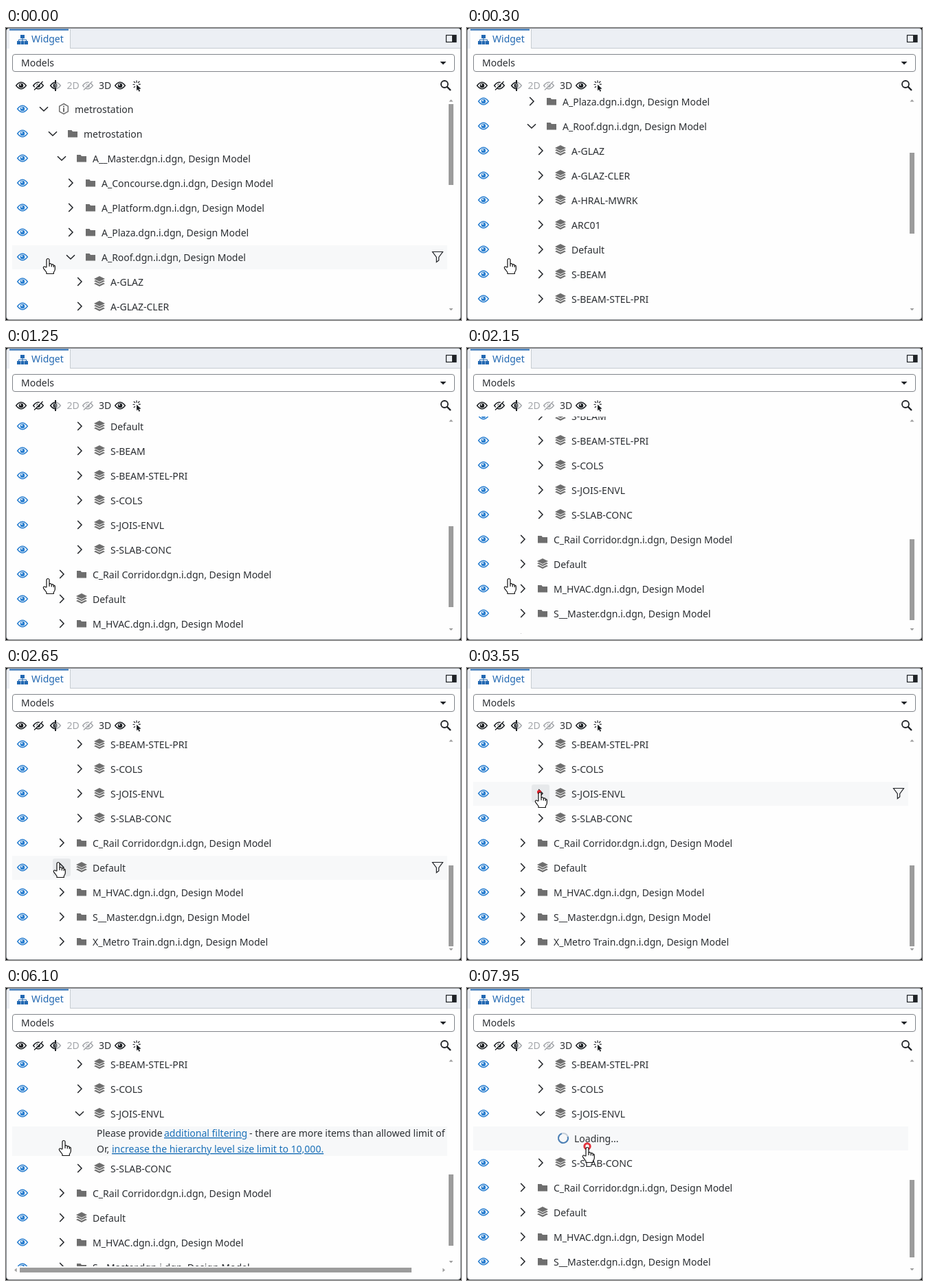
Recreate the animation shown at these times as an HTML page. Size 662x426 px, loop 8 s.

```html
<!DOCTYPE html>
<html lang="en">
<head>
<meta charset="utf-8">
<title>Model tree</title>
<style>
html, body { margin: 0; width: 100%; height: 100%; overflow: hidden; background: #000; }
svg { display: block; width: 662px; height: 426px; font: 14px "Noto Sans", "Open Sans", sans-serif; }
text { fill: #2b2e32; white-space: pre; }
.line { fill: none; stroke: currentColor; stroke-width: 1.5; }
.dark { color: #1f2226; }
.dim { color: #a3a6aa; }
.blue { color: #2a7fd0; }
.gray { color: #6e6e6e; }
.link { fill: #1a70b8; text-decoration: underline; }
.link.hot { fill: #0c4a80; }
.bar { fill: #9c9c9c; }
</style>
</head>
<body>
<svg viewBox="0 0 662 426">
  <defs>
    <g id="eye">
      <path class="line" d="M-7.3 0Q0-9.4 7.3 0Q0 9.4-7.3 0Z"/>
      <circle r="3.3" fill="currentColor"/>
      <circle cx="-1" cy="-1.2" r="1.1" fill="#fff"/>
    </g>
    <g id="eyeOff">
      <path class="line" d="M-7.3 0Q0-9.4 7.3 0Q0 9.4-7.3 0Z"/>
      <circle r="2.8" fill="currentColor"/>
      <path d="M-7 5.5L6-7" stroke="#fefefe" stroke-width="2"/>
      <path class="line" d="M-6 6.5L6.5-6"/>
    </g>
    <path id="closed" class="line" stroke-width="1.7" d="M-2.8-6L3 0L-2.8 6"/>
    <path id="open" class="line" stroke-width="1.7" d="M-6-2.8L0 3L6-2.8"/>
    <path id="folder" fill="currentColor" d="M-7-5H-1.5L0-3H7V5.5H-7Z"/>
    <g id="layers" fill="currentColor">
      <path d="M0-8L8-4L0 0L-8-4Z"/>
      <path d="M-8-.8L-5.6-2L0 .9L5.6-2L8-.8L0 3.2Z"/>
      <path d="M-8 2.9L-5.6 1.7L0 4.6L5.6 1.7L8 2.9L0 7Z"/>
    </g>
    <g id="info">
      <path class="line" stroke-width="1.1" d="M0-7.5L6.3-3.8V3.8L0 7.5L-6.3 3.8V-3.8Z"/>
      <path d="M-1-4.5H1V-2.7H-1ZM-1-1.5H1V4.5H-1Z" fill="currentColor"/>
    </g>
    <path id="arrow" class="bar" d="M-3 1.6L0-1.8L3 1.6Z"/>
    <clipPath id="view"><rect id="viewBox" x="9" y="100" width="633" height="317"/></clipPath>
  </defs>

  <rect x=".5" y=".5" width="661" height="425" rx="4" fill="#fefefe" stroke="#85898e"/>
  <path d="M1 30V4Q1 1 4 1H658Q661 1 661 4V30Z" fill="#eceff4"/>
  <path d="M93.5 29.5H661" stroke="#c6cbd1"/>
  <rect x="5" y="2" width="88" height="28" fill="#fefefe"/>
  <path d="M93.5 2V30" stroke="#c6cbd1"/>
  <rect x="5" y="1.5" width="86" height="2" fill="#2268b2"/>
  <g fill="#2268b2">
    <path d="M21 10H27V15H21ZM16 19H21V24H16ZM21.5 19H26.5V24H21.5ZM27 19H32V24H27Z"/>
    <path d="M24 14V19M18.5 20V17H29.5V20" fill="none" stroke="#2268b2"/>
    <text x="37" y="21" style="fill:#2268b2">Widget</text>
  </g>
  <rect x="640.5" y="10.5" width="14.5" height="10" fill="none" stroke="#1f2226" stroke-width="1.2"/>
  <rect x="649" y="10" width="6" height="11" fill="#1f2226"/>

  <rect x="9.5" y="38.5" width="643" height="25" rx="3.5" fill="#fff" stroke="#808489"/>
  <text x="22" y="56">Models</text>
  <path d="M631.5 49H640.5L636 53.5Z" fill="#1f2226"/>

  <g class="dark">
    <use href="#eye" x="22" y="84"/>
    <use href="#eyeOff" x="47" y="84"/>
    <use href="#eye" x="166" y="84"/>
    <text x="135" y="89">3D</text>
    <g transform="translate(191 84)">
      <path d="M-1-1.5L5.5 4.5L2.6 4.9L4.2 8L2.4 8.8L1 5.6L-1 7.4Z" fill="currentColor"/>
      <path class="line" style="stroke-width:1.2" d="M-1-4V-7.5M-3.5-1.5H-6.5M-3-4L-5.2-6.2M1-4L3.4-6.2M1.8-1.8H4.8M-3 .8L-5.2 3"/>
    </g>
    <g class="line">
      <circle cx="638" cy="82" r="5" stroke-width="1.8"/>
      <path d="M641.6 85.6L647 91" stroke-width="2.4"/>
    </g>
  </g>
  <g class="dim">
    <text x="88.5" y="89" style="fill:#a3a6aa">2D</text>
    <use href="#eyeOff" x="119" y="84"/>
    <use href="#eye" x="72" y="84"/>
  </g>
  <path class="line dark" d="M72 79.3Q68 79.5 64.7 84Q68 88.5 72 88.7"/>
  <path d="M72 80.7A3.3 3.3 0 0 0 72 87.3ZM71 76H73V92H71Z" fill="#1f2226"/>

  <g clip-path="url(#view)">
    <g id="content">
      <rect id="hover" x="9" width="633" fill="#f7f8f9"/>
      <rect id="button" width="26" height="26" rx="3" fill="#e7e9eb"/>
      <g id="upper"></g>
      <g id="lower"></g>
      <g id="message" transform="translate(0 576)">
        <text x="132" y="16">Please provide</text>
        <text x="230" y="16" class="link">additional filtering</text>
        <text x="354" y="16">- there are more items than allowed limit of</text>
        <text x="132" y="39">Or,</text>
        <text x="154" y="39" class="link" id="raise">increase the hierarchy level size limit to 10,000.</text>
      </g>
      <g id="loading" transform="translate(0 576)">
        <g transform="translate(140 18)" fill="none" stroke-width="2">
          <circle r="7" stroke="#c3cdd8"/>
          <path id="arc" d="M0-7A7 7 0 1 0 7 0" stroke="#4a7fb5"/>
        </g>
        <text x="156" y="24">Loading...</text>
      </g>
      <path id="filter" class="line dark" style="stroke-width:1.2" d="M-7.5-7.5H7.5L1.7 .5V5L-1.7 7.5V.5Z"/>
    </g>
  </g>

  <use href="#arrow" x="647.5" y="106"/>
  <g id="down"><use href="#arrow" transform="rotate(180)"/></g>
  <rect id="thumb" class="bar" x="644" width="7"/>
  <g id="across">
    <use href="#arrow" transform="translate(14 411.5) rotate(-90)"/>
    <use href="#arrow" transform="translate(637 411.5) rotate(90)"/>
    <rect class="bar" x="20" y="408" width="570" height="7"/>
  </g>

  <circle id="ring" fill="none" stroke="#e0202b" stroke-width="3"/>
  <g id="hand" stroke="#111" stroke-width="1.2" stroke-linejoin="round">
    <path fill="#fff" d="M-2 13V2.5a2 2 0 0 1 4 0V8.5a1.8 1.8 0 0 1 3.3.8a1.8 1.8 0 0 1 3 1a1.6 1.6 0 0 1 2 1.5V16q0 2-2 4.5V22.5H-2V20.5L-6.3 14.8q-1-1.8.3-2.6q1.2-.6 2.5.6z"/>
    <path fill="none" d="M2 8.5V12M5.3 9.5V12.5M8.3 10.5V13"/>
  </g>
</svg>
<script>
const LOOP = 8000, STEP = 50, ROW = 36, TOP = 100, SPLIT = 16;
const $ = id => document.getElementById(id);
const model = name => name + '.dgn.i.dgn, Design Model';

// [indent level, icon, label, expanded]
const rows = [
  [0, 'info', 'metrostation', 1],
  [1, 'folder', 'metrostation', 1],
  [2, 'folder', model('A__Master'), 1],
  ...['A_Concourse', 'A_Platform', 'A_Plaza'].map(n => [3, 'folder', model(n)]),
  [3, 'folder', model('A_Roof'), 1],
  ...['A-GLAZ', 'A-GLAZ-CLER', 'A-HRAL-MWRK', 'ARC01', 'Default', 'S-BEAM', 'S-BEAM-STEL-PRI',
    'S-COLS', 'S-JOIS-ENVL', 'S-SLAB-CONC'].map(n => [4, 'layers', n]),
  [2, 'folder', model('C_Rail Corridor')],
  [2, 'layers', 'Default'],
  ...['M_HVAC', 'S__Master', 'X_Metro Train'].map(n => [2, 'folder', model(n)])
];

rows.forEach(([level, icon, label, expanded], i) => {
  const x = 13 * level, y = i * ROW + 18;
  $(i < SPLIT ? 'upper' : 'lower').insertAdjacentHTML('beforeend',
    `<use class="blue" href="#eye" x="24" y="${y}"/>
     <use class="dark" id="chev${i}" href="#${expanded ? 'open' : 'closed'}" x="${55 + x}" y="${y}"/>
     <use class="gray" href="#${icon}" x="${84 + x}" y="${y}"/>
     <text x="${100 + x}" y="${y + 6}">${label}</text>`);
});

// [start, end, ...values reached at end]
const scrolls = [[0, 345, 200], [545, 750, 300], [1000, 1212, 400], [2018, 2230, 475]];
const moves = [[2260, 3250, 106, 181], [4950, 5350, 84, 222], [7100, 7650, 175, 232]];
const clicks = [[3550, 105, 181], [7850, 175, 231]];

function tween(from, segments, t) {
  return segments.reduce((value, [start, end, ...to]) => {
    const p = Math.min(1, Math.max(0, (t - start) / (end - start)));
    const k = p * p * (3 - 2 * p);
    return value.map((v, i) => v + (to[i] - v) * k);
  }, from);
}

const set = (id, attrs) => { for (const k in attrs) $(id).setAttribute(k, attrs[k]); };
const show = (id, on) => set(id, { visibility: on ? 'visible' : 'hidden' });
const move = (id, x, y) => set(id, { transform: `translate(${x} ${y})` });

function draw(t) {
  const scroll = Math.round(tween([0], scrolls, t)[0]);
  const [x, y] = tween([61, 336], moves, t);
  const expanded = t >= 3600;
  const message = t >= 4050 && t < 7900;
  const loading = expanded && !message;
  const extra = message ? 44 : loading ? ROW : 0;

  move('content', 0, TOP - scroll);
  move('lower', 0, extra);
  show('message', message);
  show('loading', loading);
  set('chev15', { href: expanded ? '#open' : '#closed' });
  set('arc', { transform: `rotate(${t * 0.36 % 360})` });

  // scrollbars
  const view = message ? 306 : 317, track = message ? 284 : 295;
  const scale = track / (rows.length * ROW + extra);
  set('viewBox', { height: view });
  set('thumb', { y: Math.round(111 + scroll * scale), height: Math.round(view * scale) });
  move('down', 647.5, message ? 399.5 : 410.5);
  show('across', message);

  // row under the pointer
  const at = y - TOP + scroll, gap = SPLIT * ROW;
  const inExtra = at >= gap && at < gap + extra;
  const index = Math.floor((at < gap ? at : at - extra) / ROW);
  const top = inExtra ? gap : index * ROW + (at < gap ? 0 : extra);
  const active = t < 50 || t >= 2300;
  const plain = active && !inExtra;
  show('hover', active);
  set('hover', { y: top + 1, height: (inExtra ? extra : ROW) - 1 });
  show('filter', plain);
  move('filter', message ? 629 : 628, top + 18);
  const chevX = 55 + 13 * rows[index][0];
  show('button', plain && Math.abs(x - chevX) < 13);
  set('button', { x: chevX - 13, y: top + 5 });
  $('raise').classList.toggle('hot', message && inExtra && x > 154 && y > 228);

  // click ripple
  const click = clicks.find(c => t >= c[0] && t < c[0] + 1200);
  show('ring', click);
  if (click) {
    const p = (t - click[0]) / 1200;
    set('ring', { cx: click[1], cy: click[2], r: 1.5 + 32 * p, opacity: 1 - p });
  }
  move('hand', Math.round(x), Math.round(y));
}

const began = performance.now();
function tick() {
  const t = (performance.now() - began) % LOOP;
  draw(Math.floor(t / STEP) * STEP);
  requestAnimationFrame(tick);
}
tick();
</script>
</body>
</html>
```
